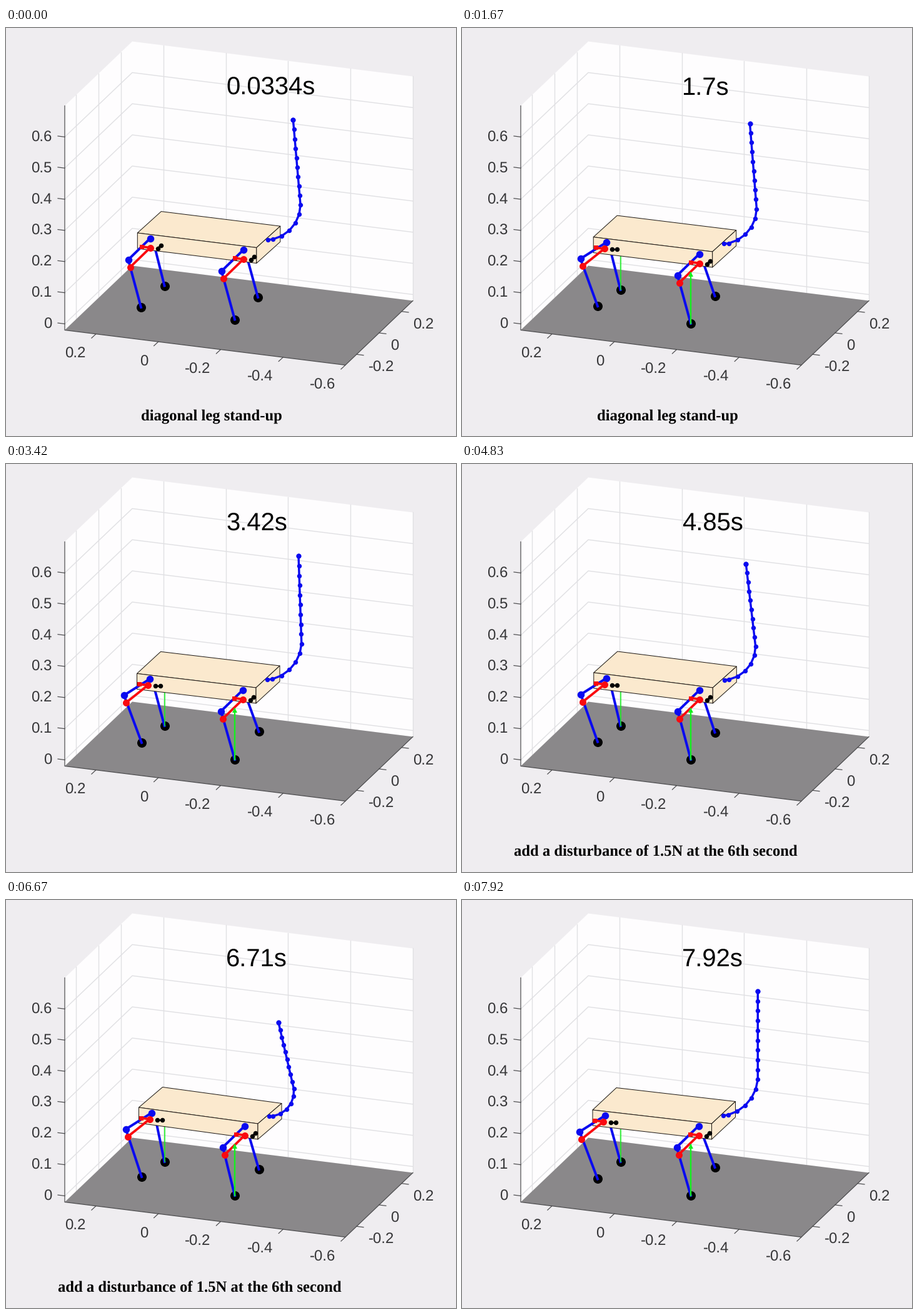
Write a matplotlib script that moves like this. It is 720 by 653 pixels and loops after 8 s.

```python
import numpy as np
import matplotlib.pyplot as plt
from matplotlib.animation import FuncAnimation
from matplotlib.patches import Polygon

W, H, DPI = 720, 653, 64
PT = 72 / DPI                      # points per pixel
FRAMES, LOOP = 96, 8000

BLUE, RED, GREEN = "#0a0af0", "#fa0a0f", "#14f01e"
INK = "#363638"

plt.rcParams["text.hinting"] = "none"
fig = plt.figure(figsize=(W / DPI, H / DPI), dpi=DPI, facecolor="#efedf0")
ax = fig.add_axes([0, 0, 1, 1])
ax.set_xlim(0, W)
ax.set_ylim(H, 0)
ax.axis("off")


def vec(x, y):
    return np.array([x, y], float)


def line(pts, color, width, z, **kw):
    x, y = np.transpose(pts)
    return ax.plot(x, y, color=color, lw=width * PT, zorder=z, **kw)[0]


def chain(color, width, size, z, marker="o"):
    return line([(0, 0)], color, width, z, marker=marker, ms=size * PT,
                mew=0, solid_joinstyle="round")


def poly(pts, color, z, edge="none", width=0):
    return ax.add_patch(Polygon(pts, facecolor=color, edgecolor=edge,
                                lw=width * PT, zorder=z, joinstyle="round"))


def label(pos, s, size, **kw):
    kw = {"ha": "left", "va": "center_baseline", "color": INK,
          "family": "Liberation Sans", **kw}
    return ax.text(*pos, s, fontsize=size * PT, zorder=30, **kw)


# ---- plot box: three edge vectors from the front-left floor corner ----
O = vec(94, 483.5)
EX, EY, EZ = vec(449, 56), vec(108, -103), vec(0, -359)


def at(x, y, z):
    """Stage position of a data point."""
    return O + EX * (0.3 - x) / 0.9 + EY * (y + 0.3) / 0.6 + EZ * (z + 0.02) / 0.72


def draw_box():
    grid = dict(color="#e0e0e3", width=1.4, z=1)
    axis = dict(color="#4a4a4c", width=1.2, z=3)
    out, down = vec(11, 1.4), vec(-7, 6.5)

    poly([O, O + EZ, O + EY + EZ, O + EX + EY + EZ, O + EX + EY, O + EY], "#fefdfe", 0)
    poly([O, O + EY, O + EX + EY, O + EX], "#8a888a", 2)
    line([O + EZ, O, O + EX, O + EX + EY], **axis)

    for z in np.arange(7) / 10:
        p = at(.3, -.3, z)
        line([p, at(.3, .3, z), at(-.6, .3, z)], **grid)
        line([p, p - out], **axis)
        label(p + (-21, -1.5), f"{z:g}", 24, ha="right")
    for x in (.2, 0, -.2, -.4, -.6):
        p = at(x, -.3, -.02)
        line([at(x, .3, -.02), at(x, .3, .7)], **grid)
        line([p, p + down], **axis)
        label(p + (-16, 29.5), f"{x:g}", 24, ha="right")
    for y in (-.2, 0, .2):
        p = at(-.6, y, -.02)
        line([at(.3, y, -.02), at(.3, y, .7)], **grid)
        line([p, p + out], **axis)
        label(p + (18.5, 19), f"{y:g}", 24)


draw_box()


# ---- motion over time ----
# turning points of the tail's lean: 0 upright, 1 fully swung
LEAN = [(0, .38), (6, .41), (13, 0), (20, .35), (26, .1), (32, .3),
        (39, .14), (57, .51), (70, .1), (80, 1), (91, -.2), (95, 0)]
CLOCK = [(0, .0334), (6, .517), (20, 1.7), (41, 3.42), (57, 4.85), (80, 6.71), (95, 7.92)]


def ease(u):
    return .5 - .5 * np.cos(np.pi * np.clip(u, 0, 1))


def lean(k):
    for (a, p), (b, q) in zip(LEAN, LEAN[1:]):
        if k <= b:
            return p + (q - p) * ease((k - a) / (b - a))


def caption_at(k):
    if k < 36:
        return 216, "diagonal leg stand-up"
    if 48 <= k < 84:
        return 83, "add a disturbance of 1.5N at the 6th second"
    return 0, ""


# ---- robot ----
class FrontLeg:
    """Blue leg with its red linkage and black joints, hung from the hip."""

    KNEE, PIVOT, AXLE, ROD_END = vec(-35, 34), vec(-14, 13), vec(0, 15), vec(-32, 46)
    PIN_A, PIN_B = vec(12, 16), vec(17, 11)

    def __init__(self, z=12):
        self.foot = chain("black", 0, 15, z)
        self.rod = chain(BLUE, 4, 0, z + 1)
        self.link = chain(RED, 3.8, 0, z + 3)
        self.pivot = chain(RED, 0, 7, z + 3, "s")
        self.pins = chain("black", 2.5, 7.5, z + 3)
        self.joints = chain(BLUE, 0, 11.5, z + 4)
        self.red = chain(RED, 0, 11, z + 5)

    def place(self, hip, foot, lift):
        far, near = lift * vec(-6, -8), lift * vec(-3, -5)
        knee = hip + self.KNEE + far
        pivot, axle = hip + self.PIVOT + near, hip + self.AXLE + near
        end = hip + self.ROD_END + far
        pins = [hip + self.PIN_A + near, hip + self.PIN_B]
        for art, pts in ((self.foot, [foot]), (self.rod, [hip, knee, foot]),
                         (self.joints, [hip, knee]), (self.link, [pivot, axle, end]),
                         (self.pivot, [pivot]), (self.red, [axle, end]),
                         (self.pins, pins)):
            art.set_data(*np.transpose(pts))


class RearLeg:
    """Rod whose upper end is hidden by the body."""

    def __init__(self):
        self.foot = chain("black", 0, 15, 5)
        self.rod = chain(BLUE, 4, 0, 6)

    def place(self, hip, foot):
        self.rod.set_data(*np.transpose([hip, foot]))
        self.foot.set_data(*np.transpose([foot]))


class Force:
    """Green ground reaction arrow."""

    def __init__(self, height, width, z, head):
        self.height = height
        self.shaft = line([(0, 0)], GREEN, width, z)
        self.head = chain(GREEN, 0, head, z, "^")

    def place(self, foot, shown):
        x, y = foot
        self.shaft.set_data([x, x], [y, y - self.height])
        self.head.set_data([x], [y - self.height + 2])
        for art in (self.shaft, self.head):
            art.set_visible(shown)


def tail_points(root, w):
    """Links turn steadily from near level up to the lean's end angle."""
    i = np.arange(15)
    turn = np.radians(np.minimum(8 - 8 * w + (14 + 3.5 * w) * i, 90 + 13 * w))
    size = (15.7 - 3.6 * w * w) * np.where(i == 0, .5, 1)
    x = root[0] + np.cumsum(size * np.cos(turn))
    y = root[1] - np.cumsum(size * np.sin(turn))
    return np.r_[root[0], x], np.r_[root[1], y]


rear_left, rear_right = RearLeg(), RearLeg()
left, right = FrontLeg(), FrontLeg()
faces = [poly([(0, 0)] * 4, "#fbe9ce", 8, "#1c1814", 1) for _ in range(3)]
tail = chain(BLUE, 3.4, 7.4, 10)
tip = chain(BLUE, 0, 8.2, 10)
rear_force, front_force = Force(65, 1.6, 7, 0), Force(81, 2.4, 20, 8)

clock = label((352, 106.5), "", 40, va="baseline", color="black")
caption = label((0, 627), "", 24.6, va="baseline", color="black",
                family="Liberation Serif", weight="bold")


def update(k):
    w = lean(k)
    lift = ease(k / 14)                        # swing legs leave the ground
    drop = vec(0, -6.5 * np.exp(-k / 3))       # the robot settles on the floor
    back = vec(-2.8 * np.sin(np.pi * lift), 0)

    fl = vec(209 + 3.5 * w, 336 - 4 * w) + drop
    fr = vec(399.5 + 3.5 * w, 358) + drop
    bl = vec(247 + 3.5 * w, 300.5 - w) + drop
    br, low = fr + bl - fl, vec(0, 25)
    faces[0].set_xy([fl, fr, br, bl])
    faces[1].set_xy([fl, fr, fr + low, fl + low])
    faces[2].set_xy([fr, br, br + low, fr + low])

    stance, rear_stance = vec(366, 473) + drop, vec(253.5, 419) + drop
    swing = vec(216, 453.5) + lift * vec(1, -7 - 3.5 * w) + back + drop
    rear_swing = vec(403, 437.5) + lift * vec(1.5, -9.5 + 3 * w) + back + drop
    left.place(fl + (20.3, 8.8), swing, lift)
    right.place(fr + (-21, 3.6), stance, 0)
    rear_left.place(fl + (28, 24), rear_stance)
    rear_right.place(fr + (-14.5, 18), rear_swing)
    front_force.place(stance, k > 0)
    rear_force.place(rear_stance, k > 0)

    x, y = tail_points(vec(418 + 3 * w, 345 + w) + drop, w)
    tail.set_data(x, y)
    tip.set_data(x[-1:], y[-1:])

    clock.set_text(f"{np.interp(k, *np.transpose(CLOCK)):.3g}s")
    cx, words = caption_at(k)
    caption.set_x(cx)
    caption.set_text(words)
    return []


anim = FuncAnimation(fig, update, frames=FRAMES, init_func=lambda: update(0),
                     interval=LOOP / FRAMES, repeat=True, repeat_delay=0, blit=False)
plt.show()
```
